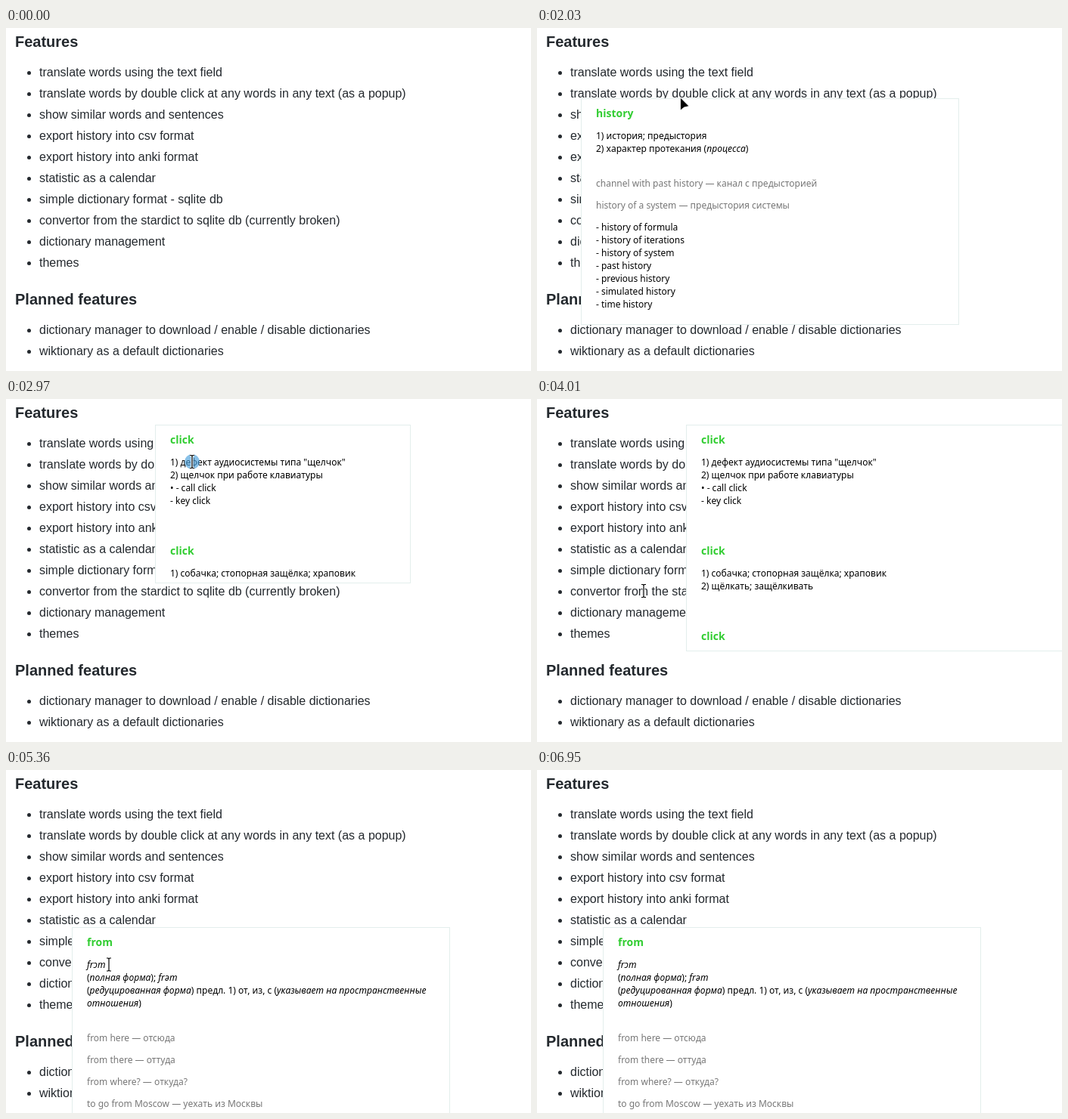
Recreate the animation shown at these times as an HTML page. Size 694 px wide and 454 px high, loop 7960 ms.

```html
<!DOCTYPE html>
<html lang="en">
<head>
<meta charset="utf-8">
<title>Popup dictionary</title>
<style>
html, body { margin: 0; width: 100%; height: 100%; overflow: hidden; background: #fff; }
#stage {
  position: relative; width: 694px; height: 454px; overflow: hidden;
  color: #24292e; font: 16px/24px "Liberation Sans", Arial, sans-serif;
}
article { position: absolute; left: 12px; top: 6px; width: 670px; }
h3 { margin: 24px 0 16px; font-size: 20px; line-height: 25px; }
h3:first-child { margin-top: 0; }
ul { margin: 0 0 16px; padding-left: 32px; }
li + li { margin-top: 4px; }
.popup {
  position: absolute; display: none; box-sizing: border-box; overflow: hidden;
  border: 1px solid #e3eeec; background: #fff; color: #000;
  font: 12px/17px "Noto Sans", "Open Sans", sans-serif; white-space: pre;
}
.popup > * { position: absolute; left: 19px; margin: 0; }
.popup b { color: #32cd32; font-size: 14px; line-height: 19px; }
.popup .ex { color: #777; }
#pointer { position: absolute; left: 0; top: 0; width: 40px; height: 40px; overflow: visible; }
</style>
</head>
<body>
<div id="stage">
  <article>
    <h3>Features</h3>
    <ul>
      <li>translate words using the text field</li>
      <li>translate words by double click at any words in any text (as a popup)</li>
      <li>show similar words and sentences</li>
      <li>export history into csv format</li>
      <li>export history into anki format</li>
      <li>statistic as a calendar</li>
      <li>simple dictionary format - sqlite db</li>
      <li>convertor from the stardict to sqlite db (currently broken)</li>
      <li>dictionary management</li>
      <li>themes</li>
    </ul>
    <h3>Planned features</h3>
    <ul>
      <li>dictionary manager to download / enable / disable dictionaries</li>
      <li>wiktionary as a default dictionaries</li>
    </ul>
  </article>

  <div class="popup" style="left:58px;top:93px"><b style="top:9px">history</b><p style="top:40px">1) история; предыстория<br>2) характер протекания (<i>процесса</i>)</p><p class="ex" style="top:103px">channel with past history — канал с предысторией</p><p class="ex" style="top:132px">history of a system — предыстория системы</p><p style="top:161px">- history of formula<br>- history of iterations<br>- history of system<br>- past history<br>- previous history<br>- simulated history<br>- time history</p></div>

  <div class="popup" style="left:197px;top:34px"><b style="top:9px">click</b><p style="top:40px">1) дефект аудиосистемы типа "щелчок"<br>2) щелчок при работе клавиатуры<br>• - call click<br>- key click</p><b style="top:156px">click</b><p style="top:187px">1) собачка; стопорная защёлка; храповик<br>2) щёлкать; защёлкивать</p><b style="top:269px">click</b></div>

  <div class="popup" style="left:87px;top:208px"><b style="top:9px">from</b><p style="top:40px"><i>frɔm</i><br>(<i>полная форма</i>); <i>frəm</i><br>(<i>редуцированная форма</i>) предл. 1) от, из, с (<i>указывает на пространственные</i><br><i>отношения</i>)</p><p class="ex" style="top:137px">from here — отсюда</p><p class="ex" style="top:166px">from there — оттуда</p><p class="ex" style="top:195px">from where? — откуда?</p><p class="ex" style="top:224px">to go from Moscow — уехать из Москвы</p></div>

  <svg id="pointer">
    <circle id="pulse" r="10" fill="#4a9fdc"/>
    <g id="beam" fill="none">
      <path id="bar" d="M-3 -8.5H-1L0 -7.5L1 -8.5H3M0 -7.5V7.5M-3 8.5H-1L0 7.5L1 8.5H3" stroke="#fff" stroke-width="3"/>
      <use href="#bar" style="display:none"/>
      <path d="M-3 -8.5H-1L0 -7.5L1 -8.5H3M0 -7.5V7.5M-3 8.5H-1L0 7.5L1 8.5H3" stroke="#000" stroke-width="1.2"/>
    </g>
    <path id="arrow" d="M0 0V17L5 13L11.5 11.5Z" fill="#000" stroke="#fff" stroke-width=".8" stroke-linejoin="round"/>
  </svg>
</div>

<script>
const LOOP = 7960, TICK = 40;
const $ = id => document.getElementById(id);
const clamp = v => Math.max(0, Math.min(1, v));
const boxes = [...document.querySelectorAll('.popup')];

// click: double click begins, done: popup settled, end: popup closed
const opens = [
  { click: 700, done: 1140, end: 2630 },
  { click: 2630, done: 3140, end: 4840 },
  { click: 4840, done: 5360, end: LOOP }
];

// pointer runs: [ms, x, y]
const runs = [
  [[1630, 106.5, 142.5], [2030, 189.5, 92], [2350, 246, 83]],
  [[3610, 246, 83], [4010, 141, 254], [4210, 137, 281], [4410, 138, 274], [4690, 136, 257.5]],
  [[6030, 136, 257.5], [6430, 205, 200], [6870, 264, 271], [6910, 288, 394]]
];
const arrowSpans = [[1750, 2070], [3810, 3930], [4490, 4650], [6070, LOOP]];
const shown = [700, 6950];

// smooth monotone curve through the keys, at rest at both ends
function along(keys, t, axis) {
  const last = keys.length - 1;
  if (t <= keys[0][0]) return keys[0][axis];
  if (t >= keys[last][0]) return keys[last][axis];
  const rate = i => (keys[i + 1][axis] - keys[i][axis]) / (keys[i + 1][0] - keys[i][0]);
  const slope = i => {
    if (i === 0 || i === last) return 0;
    const a = rate(i - 1), b = rate(i);
    return a * b > 0 ? 2 * a * b / (a + b) : 0;
  };
  let i = 0;
  while (t >= keys[i + 1][0]) i++;
  const span = keys[i + 1][0] - keys[i][0];
  const u = (t - keys[i][0]) / span, v = 1 - u;
  return v * v * (1 + 2 * u) * keys[i][axis] + u * u * (3 - 2 * u) * keys[i + 1][axis]
    + span * u * v * (v * slope(i) - u * slope(i + 1));
}

function drawPopup(box, o, t) {
  const from = o.done - 170;
  const now = from + Math.floor((t - from) / 50) * 50;
  const p = 0.5 - Math.cos(Math.PI * clamp((now - o.done + 293) / 200)) / 2;
  box.style.display = p > 0 && t < o.end ? 'block' : 'none';
  box.style.width = Math.round(500 * p) + 'px';
  box.style.height = Math.round(22 + 278 * p) + 'px';
}

function pulseAt(t) {
  const o = opens.find(o => t >= o.click && t < o.done);
  if (!o) return 0;
  const second = o.done - 330;
  const fade = t < second ? 1 - (t - o.click) / 160 : (o.done - t) / 150;
  return 0.65 * clamp(fade);
}

function drawPointer(t) {
  const keys = runs.filter(r => t >= r[0][0]).pop() || runs[0];
  const start = keys[0][0];
  const now = start + Math.floor((t - start) / TICK) * TICK;
  const x = along(keys, now, 1), y = along(keys, now, 2);
  const arrow = arrowSpans.some(([a, b]) => t >= a && t < b);
  $('pointer').style.display = t >= shown[0] && t < shown[1] ? 'block' : 'none';
  $('pointer').style.transform = `translate(${x}px, ${y}px)`;
  $('arrow').style.display = arrow ? '' : 'none';
  $('beam').style.display = arrow ? 'none' : '';
  $('pulse').style.opacity = pulseAt(t);
}

function draw(t) {
  boxes.forEach((box, i) => drawPopup(box, opens[i], t));
  drawPointer(t);
}

const begin = performance.now();
function frame() {
  draw((performance.now() - begin) % LOOP);
  requestAnimationFrame(frame);
}
frame();
</script>
</body>
</html>
```
